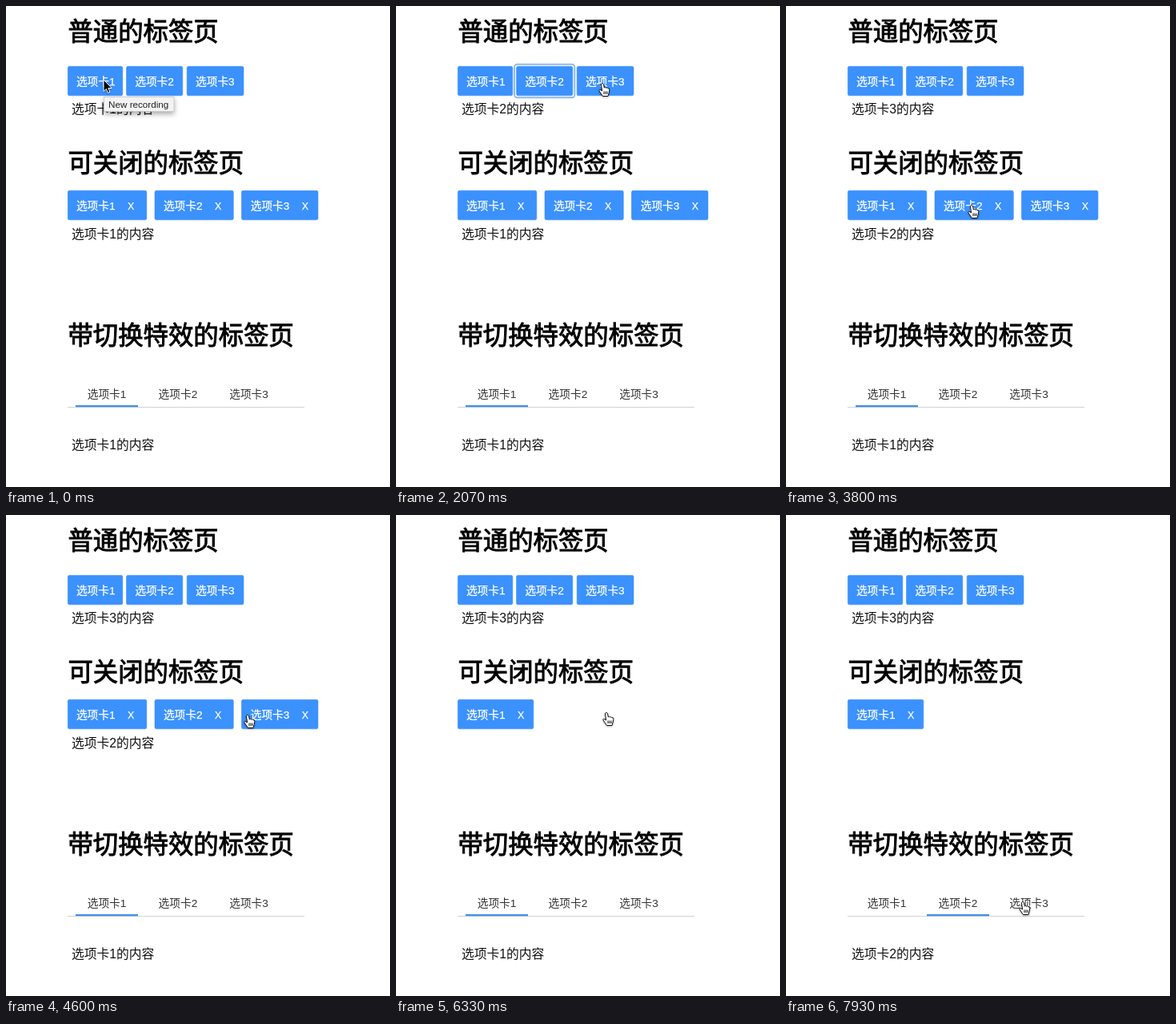
An HTML page that plays this animation: 480x600 px, repeating every 8000 ms.

```html
<!DOCTYPE html>
<html lang="zh-CN">
<head>
<meta charset="utf-8">
<title>标签页</title>
<style>
html, body { margin: 0; width: 100%; height: 100%; overflow: hidden; background: #fff; }
svg { display: block; width: 100vw; height: 100vh; font-family: "Liberation Sans", "Noto Sans CJK SC", "Noto Sans CJK", sans-serif; }
text { white-space: pre; }
.title { font-size: 31.4px; stroke: #000; stroke-width: .9px; }
.content { font-size: 15.75px; fill: #111; }
.label { font-size: 13.7px; }
.button rect { fill: #3b91fd; stroke: #3a8df6; stroke-width: .6px; }
.button text { fill: #fff; stroke: #fff; stroke-width: .25px; }
.button .close { font-size: 12.5px; }
.nav { fill: #333; }
.ring { fill: none; stroke: #8fbaf3; stroke-width: 2px; }
.tooltip rect { fill: #f3f3f3; stroke: #c6c6c6; stroke-width: .8px; filter: drop-shadow(0 3px 3px #0005); }
.tooltip text { font-size: 11.7px; fill: #222; }

/* One percent of the loop is 80 ms. */
.step { animation: 8s step-end infinite; }
.timed { visibility: hidden; }

.tooltip { animation-name: tooltip; }
@keyframes tooltip { 0% { visibility: visible } 5% { visibility: hidden } }

.ring1 { animation-name: ring1; }
.ring2 { animation-name: second; }
.ring3 { animation-name: ring3; }
@keyframes ring1 { 0% { visibility: hidden } 8% { visibility: visible } 18.75% { visibility: hidden } }
@keyframes ring3 { 0% { visibility: hidden } 27% { visibility: visible } 40.5% { visibility: hidden } }

.first { animation-name: first; }
.second { animation-name: second; }
.third { animation-name: third; }
@keyframes first { 0% { visibility: visible } 18.75% { visibility: hidden } }
@keyframes second { 0% { visibility: hidden } 18.75% { visibility: visible } 27% { visibility: hidden } }
@keyframes third { 0% { visibility: hidden } 27% { visibility: visible } }

.pane1 { animation-name: pane1; }
.pane2 { animation-name: pane2; }
.pane3 { animation-name: pane3; }
@keyframes pane1 { 0% { visibility: visible } 47.5% { visibility: hidden } }
@keyframes pane2 { 0% { visibility: hidden } 47.5% { visibility: visible } 60.5% { visibility: hidden } }
@keyframes pane3 { 0% { visibility: hidden } 60.5% { visibility: visible } 79% { visibility: hidden } }

.tab1 { animation-name: tab1; }
.tab2 { animation-name: tab2; }
.tab3 { animation-name: tab3; }
@keyframes tab1 { 0% { width: 98.5px } 79% { width: 94.5px } }
@keyframes tab2 { 0% { visibility: visible } 67.5% { visibility: hidden } }
@keyframes tab3 {
  0% { visibility: visible; transform: none }
  67.5% { visibility: visible; transform: translateX(-108.7px) }
  79% { visibility: hidden }
}
.close1 { animation-name: close1; }
.close2 { animation-name: close2; }
.close3 { animation-name: close3; }
@keyframes close1 { 0% { opacity: 1 } 36% { opacity: .3 } 39.5% { opacity: 1 } }
@keyframes close2 { 0% { opacity: 1 } 65% { opacity: .3 } }
@keyframes close3 { 0% { opacity: 1 } 75.5% { opacity: .3 } }

.page1 { animation-name: page1; }
.page2 { animation-name: page2; }
@keyframes page1 { 0% { visibility: visible } 91% { visibility: hidden } }
@keyframes page2 { 0% { visibility: hidden } 91% { visibility: visible } }
.ink { fill: #438fe9; animation: ink 8s ease-in-out infinite; }
@keyframes ink { 0%, 91% { transform: none } 94.75%, 100% { transform: translateX(89px) } }

.cursor { animation: move 8s ease-in-out infinite; filter: drop-shadow(0 1px 1px #0005); }
@keyframes move {
  0%, 9% { transform: translate(122px, 92px) }
  14%, 19.5% { transform: translate(187px, 97px) }
  25%, 28.5% { transform: translate(258px, 96px) }
  36.5%, 41% { transform: translate(142px, 242px) }
  45.5%, 49% { transform: translate(232px, 248px) }
  57.5% { transform: translate(302px, 249px) }
  61.5% { transform: translate(306px, 250px) }
  66%, 68.5% { transform: translate(263px, 247px) }
  72.5% { transform: translate(281px, 250px) }
  76%, 79.5% { transform: translate(263px, 246px) }
  87.5% { transform: translate(197px, 475px) }
  91.5% { transform: translate(205px, 479px) }
  99.1%, 100% { transform: translate(296px, 482px) }
}
.arrow { fill: #000; stroke: #fff; animation-name: arrow; }
.hand { fill: #fff; stroke: #111; stroke-linejoin: round; animation-name: hand; }
@keyframes arrow {
  0%, 30.5%, 79.5% { visibility: visible }
  5%, 34.5%, 86% { visibility: hidden }
}
@keyframes hand {
  0%, 30.5%, 79.5% { visibility: hidden }
  5%, 34.5%, 86% { visibility: visible }
}
</style>
</head>
<body>
<svg viewBox="0 0 480 600">
  <text class="title" x="77.4" y="43">普通的标签页</text>
  <g class="button label">
    <rect x="77.3" y="75.3" width="68.5" height="36.5" rx="2"/><text x="87.9" y="99">选项卡1</text>
    <rect x="150.5" y="75.3" width="70.3" height="36.5" rx="2"/><text x="161.2" y="99">选项卡2</text>
    <rect x="226.2" y="75.3" width="70.8" height="36.5" rx="2"/><text x="237" y="99">选项卡3</text>
  </g>
  <rect class="ring ring1 step timed" x="74.8" y="72.8" width="73.5" height="41.5" rx="3.5"/>
  <rect class="ring ring2 step timed" x="148" y="72.8" width="75.3" height="41.5" rx="3.5"/>
  <rect class="ring ring3 step timed" x="223.7" y="72.8" width="75.8" height="41.5" rx="3.5"/>
  <g class="content">
    <text class="first step timed" x="82" y="134.3">选项卡1的内容</text>
    <text class="second step timed" x="82" y="134.3">选项卡2的内容</text>
    <text class="third step timed" x="82" y="134.3">选项卡3的内容</text>
  </g>

  <text class="title" x="77.4" y="207">可关闭的标签页</text>
  <g class="button label">
    <g>
      <rect class="tab1 step" x="77.3" y="230.3" width="98.5" height="36.5" rx="2"/>
      <text x="87.9" y="254">选项卡1</text><text class="close close1 step" x="152" y="253.5">X</text>
    </g>
    <g class="tab2 step timed">
      <rect x="186" y="230.3" width="98.3" height="36.5" rx="2"/>
      <text x="196.9" y="254">选项卡2</text><text class="close close2 step" x="261" y="253.5">X</text>
    </g>
    <g class="tab3 step timed">
      <rect x="294.5" y="230.3" width="95.5" height="36.5" rx="2"/>
      <text x="305.7" y="254">选项卡3</text><text class="close close3 step" x="369.7" y="253.5">X</text>
    </g>
  </g>
  <g class="content">
    <text class="pane1 step timed" x="82" y="290.3">选项卡1的内容</text>
    <text class="pane2 step timed" x="82" y="290.3">选项卡2的内容</text>
    <text class="pane3 step timed" x="82" y="290.3">选项卡3的内容</text>
  </g>

  <text class="title" x="77.4" y="422">带切换特效的标签页</text>
  <g class="nav label">
    <text x="101.7" y="488.7">选项卡1</text>
    <text x="190.6" y="488.7">选项卡2</text>
    <text x="279.2" y="488.7">选项卡3</text>
  </g>
  <rect x="77" y="500" width="296" height="1" fill="#cfd2d8"/>
  <rect class="ink" x="87" y="498" width="78" height="2.2"/>
  <g class="content">
    <text class="page1 step timed" x="82" y="553">选项卡1的内容</text>
    <text class="page2 step timed" x="82" y="553">选项卡2的内容</text>
  </g>

  <g class="tooltip step timed">
    <rect x="122.5" y="113.5" width="87.5" height="18"/>
    <text x="128" y="126.5">New recording</text>
  </g>
  <g class="cursor">
    <path class="arrow step timed" d="M0 0V14.5L3.4 11.4L5.6 16.4L8 15.4L5.8 10.5H10.2Z"/>
    <path class="hand step timed" d="M-1.6 1.5Q0 -.8 1.5 1.5L2.3 6Q3.5 4.6 4.6 6.2Q6 5 6.8 6.7Q8.6 6 8.8 8.5L8.3 12L7 16.5H.5L-2 13L-4.2 9.5Q-4 7.6 -2 8.8L-.4 10ZM2 10.5V14M4 10.5V14M6 10.5V14"/>
  </g>
</svg>
</body>
</html>
```
